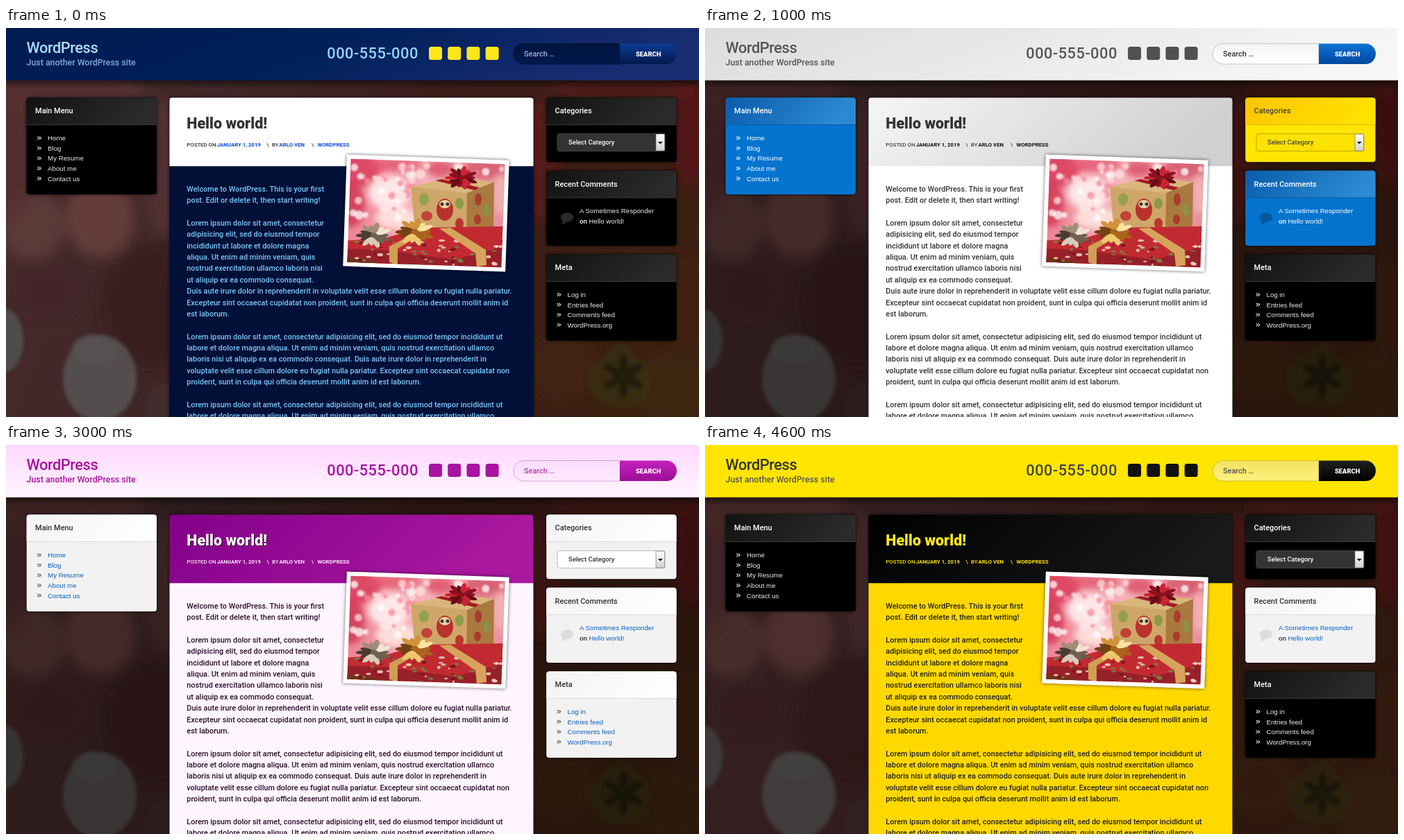
These frames come from a looping animation (998x561 px, 5 s). An HTML page:

```html
<!DOCTYPE html>
<html lang="en">
<head>
<meta charset="utf-8">
<title>Theme colours</title>
<style>
html, body { margin: 0; width: 100%; height: 100%; overflow: hidden; background: #000; }
svg { display: block; width: 998px; height: 561px; }
text { font-family: Roboto, sans-serif; font-weight: 500; white-space: pre; }
.link { font-family: "Liberation Sans", Arial, sans-serif; font-weight: 400; }
</style>
</head>
<body>
<svg id="stage" viewBox="0 0 998 561" xmlns="http://www.w3.org/2000/svg"></svg>
<script>
const stage = document.getElementById('stage');
const HOLD = 1000;

// Sidebar panel skins
const skins = {
  black: { head: ['#121212', '#2b2b2b'], body: '#000', line: '#3a3a3a', title: '#fff', link: '#eee', icon: '#ccc', bubble: '#2a2a2a', field: '#333', edge: '#444' },
  blue: { head: ['#0a5cab', '#2c8ad3'], body: '#0574cf', line: '#0a5ba5', title: '#fff', link: '#fff', icon: '#d5e8f8', bubble: '#04589e', field: '#0574cf', edge: '#0459a0' },
  yellow: { head: ['#ffc400', '#ffe100'], body: '#ffe500', line: '#dfb900', title: '#444', link: '#222', icon: '#444', bubble: '#c9a900', field: '#fbe200', edge: '#c4a500' },
  white: { head: ['#f3f3f3', '#fefefe'], body: '#f2f2f2', line: '#d9d9d9', title: '#333', link: '#0a60c0', icon: '#666', bubble: '#dcdcdc', field: '#fff', edge: '#bbb' }
};

// panels: menu, categories, comments, meta
const themes = [
  { dim: 0, bar: ['#001b50', '#00205a', '#182d72'], barDir: 'diag', name: '#a9dcff', tag: '#7ea9dc', phone: '#99d4fb', icons: '#ffe61a',
    input: ['#001440', '#00194c'], inputEdge: '#00102f', hint: '#9ab3da', button: ['#0c3c92', '#00194e'],
    head: ['#fff', '#fff'], title: '#333', meta: '#333', metaLink: '#0a4bd0', body: '#001037', text: '#7cc6f8', frame: '#fff',
    panels: ['black', 'black', 'black', 'black'] },
  { dim: .3, bar: ['#dcdcdc', '#f6f6f6'], barDir: 'diag', name: '#555', tag: '#555', phone: '#555', icons: '#505050',
    input: ['#f4f4f4', '#fff'], inputEdge: '#c4c4c4', hint: '#333', button: ['#0d72d4', '#00479f'],
    head: ['#f5f5f5', '#d0d0d0'], title: '#333', meta: '#444', metaLink: '#111', body: '#fff', text: '#333', frame: '#fff',
    panels: ['blue', 'yellow', 'blue', 'black'] },
  { dim: 0, bar: ['#0f0028', '#0b0020'], barDir: 'down', name: '#d2bcff', tag: '#eac0ff', phone: '#d8c0f2', icons: '#dab8fb',
    input: ['#23115e', '#331a86'], inputEdge: '#1a0c48', hint: '#b9a5e4', button: ['#14003c', '#080019'],
    head: ['#190045', '#330057'], title: '#e6d5ff', meta: '#d9c4f5', metaLink: '#d9c4f5', body: '#12001f', text: '#e0d2f3', frame: '#050008',
    panels: ['black', 'black', 'black', 'black'] },
  { dim: .3, bar: ['#ffd8ff', '#fff5ff'], barDir: 'down', name: '#a8139f', tag: '#a8139f', phone: '#a8139f', icons: '#a8139f',
    input: ['#fbdcfb', '#ffeaff'], inputEdge: '#d3a4d3', hint: '#b83bb1', button: ['#c61fbd', '#9c0f95'],
    head: ['#83008a', '#ab189f'], title: '#fff', shade: '#300030', meta: '#fbe6fb', metaLink: '#fbe6fb', body: '#fff5ff', text: '#2a1029', frame: '#fff',
    panels: ['white', 'white', 'white', 'white'] },
  { dim: .22, bar: ['#ffe500', '#ffe500'], barDir: 'down', name: '#333', tag: '#555', phone: '#444', icons: '#111',
    input: ['#f3e15e', '#fff27f'], inputEdge: '#d2bd22', hint: '#555', button: ['#202020', '#000'],
    head: ['#000', '#191919'], title: '#ffe81a', meta: '#ffe500', metaLink: '#ffe500', body: '#ffd800', text: '#222', frame: '#fff',
    panels: ['black', 'black', 'white', 'black'] }
];

const copy = [
  'Welcome to WordPress. This is your first',
  'post. Edit or delete it, then start writing!',
  '',
  'Lorem ipsum dolor sit amet, consectetur',
  'adipisicing elit, sed do eiusmod tempor',
  'incididunt ut labore et dolore magna',
  'aliqua. Ut enim ad minim veniam, quis',
  'nostrud exercitation ullamco laboris nisi',
  'ut aliquip ex ea commodo consequat.',
  'Duis aute irure dolor in reprehenderit in voluptate velit esse cillum dolore eu fugiat nulla pariatur.',
  'Excepteur sint occaecat cupidatat non proident, sunt in culpa qui officia deserunt mollit anim id',
  'est laborum.',
  '',
  'Lorem ipsum dolor sit amet, consectetur adipisicing elit, sed do eiusmod tempor incididunt ut',
  'labore et dolore magna aliqua. Ut enim ad minim veniam, quis nostrud exercitation ullamco',
  'laboris nisi ut aliquip ex ea commodo consequat. Duis aute irure dolor in reprehenderit in',
  'voluptate velit esse cillum dolore eu fugiat nulla pariatur. Excepteur sint occaecat cupidatat non',
  'proident, sunt in culpa qui officia deserunt mollit anim id est laborum.'
];
copy.push('', copy[13], copy[14]);

// Baselines sit on whole pixels
const text = (x, y, size, fill, str, more = '') => `<text x="${x}" y="${Math.round(y)}" font-size="${size}" fill="${fill}" ${more}>${str}</text>`;
const link = (x, y, fill, str) => text(x, y, 9.7, fill, str, 'class="link"');
const rect = (x, y, w, h, fill, more = '') => `<rect x="${x}" y="${y}" width="${w}" height="${h}" fill="${fill}" ${more}/>`;
const path = (d, fill, more = '') => `<path d="${d}" fill="${fill}" ${more}/>`;
const ellipse = ([x, y, rx, ry, fill, opacity = 1]) => `<ellipse cx="${x}" cy="${y}" rx="${rx}" ry="${ry}" fill="${fill}" opacity="${opacity}"/>`;
const ends = { down: 'x2="0" y2="1"', across: 'x2="1" y2="0"', diag: 'x2="1" y2=".2"' };
const gradient = (id, colours, dir) => `<linearGradient id="${id}" ${ends[dir]}>` +
  colours.map((c, i) => `<stop offset="${i / (colours.length - 1)}" stop-color="${c}"/>`).join('') + '</linearGradient>';
const blur = (id, amount) => `<filter id="${id}" x="-30%" y="-30%" width="160%" height="160%"><feGaussianBlur stdDeviation="${amount}"/></filter>`;

function seeded(seed) {
  return () => (seed = seed * 16807 % 2147483647) / 2147483647;
}

function backdrop(dim) {
  const lights = [
    [60, 90, 140, 40, '#5c3434', .7], [135, 273, 50, 58, '#6f4440', .75], [38, 285, 46, 50, '#65403e', .75],
    [5, 190, 40, 90, '#573133', .7], [215, 400, 80, 90, '#3a1d1d', .7], [60, 380, 50, 40, '#422628', .7],
    [226, 200, 30, 100, '#5c3836', .6], [770, 190, 30, 90, '#5f1b1e', .7], [890, 88, 110, 22, '#551d1a', .7],
    [985, 150, 25, 80, '#5e1517', .7], [985, 400, 40, 70, '#442415', .7], [800, 490, 50, 50, '#472417', .6], [960, 520, 60, 50, '#40280f', .7]
  ];
  const greys = [[135, 505, 53, 62, '#555151', .95], [128, 464, 33, 22, '#555151', .95], [-3, 450, 28, 46, '#524e4d', .95], [225, 548, 24, 35, '#453231', .5]];
  const leaves = [0, 60, 120, 180, 240, 300].map(a => `<ellipse cx="889" cy="485" rx="6" ry="15" fill="#1b190a" transform="rotate(${a} 889 502)"/>`).join('');
  return rect(0, 0, 998, 561, 'url(#ground)') +
    `<g filter="url(#soft)">${lights.map(ellipse).join('')}</g>` +
    `<g filter="url(#edge)">${greys.map(ellipse).join('')}` +
    path('M888 452Q905 465 926 490Q938 520 915 542Q890 555 856 541Q828 520 838 490Q862 470 888 452Z', '#38300f', 'opacity=".7"') +
    `<g opacity=".75">${leaves}</g></g>` +
    rect(0, 0, 998, 561, '#000', `opacity="${dim}"`) + rect(0, 75, 998, 12, 'url(#fall)');
}

function bow(x, y, size, colours) {
  const petals = Array.from({ length: 14 }, (_, i) =>
    `<ellipse cx="${x + size * (i % 2 ? .6 : .4)}" cy="${y}" rx="${size * .42}" ry="${size * .16}" fill="${colours[i % colours.length]}" transform="rotate(${i * 77} ${x} ${y})"/>`).join('');
  return `<g transform="translate(0 ${y * .3}) scale(1 .7)">${petals}<circle cx="${x}" cy="${y}" r="${size * .2}" fill="${colours[0]}"/></g>`;
}

function photo(frame) {
  const rnd = seeded(71);
  const washes = [
    [505, 205, 34, 24, '#d93a58', .8], [497, 255, 20, 32, '#cf3450', .8], [560, 197, 40, 10, '#e2506a', .7],
    [552, 238, 30, 24, '#fff0f0', .9], [562, 274, 30, 16, '#ffe9e2', .85], [625, 203, 20, 12, '#d8405a', .7],
    [690, 203, 32, 14, '#d4566a', .8], [712, 240, 10, 30, '#f2b4b4', .9]
  ];
  const sparks = Array.from({ length: 46 }, (_, i) => {
    const r = 2.5 + rnd() * 4.5;
    return ellipse([497 + rnd() * (i % 4 ? 90 : 220), 195 + rnd() * (i % 4 ? 85 : 20), r, r, ['#fff', '#ffdfe2', '#f58a9b'][i % 3], .75]);
  }).join('');
  const prints = [
    [632, 262, 12, 16, '#b9322c'], [632, 254, 8, 6, '#e8d6a6'], [628, 254, 2.5, 2.5, '#433'], [636, 254, 2.5, 2.5, '#433'],
    [602, 247, 7, 9, '#95a04d'], [606, 271, 8, 7, '#c34237'], [653, 253, 6, 8, '#8d9a48'], [653, 282, 6, 8, '#b8372f'],
    [680, 247, 5, 9, '#a93c2c'], [693, 262, 5, 9, '#8a9147'], [679, 276, 5, 7, '#a93c2c']
  ];
  const dots = Array.from({ length: 70 }, (_, i) =>
    ellipse([496 + rnd() * 222, 306 + rnd() * 38, 1.5 + rnd() * 3, 1 + rnd() * 1.5, ['#f4d9c5', '#788343', '#7a121a'][i % 3], .85])).join('');
  return `<g transform="rotate(2 605 267)">${rect(488, 186.5, 234, 161, '#000', 'filter="url(#shadow)" opacity=".6"')}${rect(488, 186.5, 234, 161, frame)}</g>` +
    `<g clip-path="url(#print)">${rect(484, 182, 242, 170, 'url(#rosy)')}<g filter="url(#bokeh)">${washes.map(ellipse).join('')}</g><g filter="url(#spark)">${sparks}</g>` +
    path('M583 229L642 215L703 222L664 238Z', '#d9b67c') + path('M583 229L664 238L663 303L589 292Z', '#cfa669') + path('M664 238L703 222L702 290L663 303Z', '#a9793f') +
    prints.map(ellipse).join('') + path('M618 220L628 218L682 230L675 234Z', '#a31a28') +
    bow(656, 216, 24, ['#8b111d', '#c92434', '#650c16']) +
    path('M484 307L546 303L598 288L718 286V320L646 334L560 350H484Z', '#c22a32') + path('M484 318L546 320L646 334L718 315V350H484Z', '#98202a') +
    path('M484 330L530 336L560 350H484Z', '#6d3419') + dots +
    path('M624 289L640 288L691 320L692 342L678 344L676 325Z', '#d6a45c') + path('M552 315L600 290L610 291L564 318V342L552 338Z', '#cf9f55') +
    bow(589, 294, 28, ['#a9651d', '#f1c66d', '#744213', '#d0923a', '#ffe3a0']) + bow(530, 299, 26, ['#6f6052', '#d9cbb9', '#4a3b31', '#a08d77', '#efe4d4']) + '</g>';
}

function topBar(t) {
  const squares = [609, 636.2, 663.4, 690.6].map(x => rect(x, 27, 19, 19, t.icons, 'rx="3.5"')).join('');
  return rect(0, 0, 998, 75.5, 'url(#bar)') +
    text(29.5, 36, 21.84, t.name, 'WordPress', 'letter-spacing="-.45"') + text(29.5, 54.4, 12.4, t.tag, 'Just another WordPress site') +
    text(462.3, 43.8, 21.84, t.phone, '000-555-000', 'letter-spacing=".5"') + squares +
    path('M884 22.5H745.5A14.75 14.75 0 0 0 745.5 52H884Z', 'url(#input)', `stroke="${t.inputEdge}"`) +
    path('M884 22.5H951.2A14.75 14.75 0 0 1 951.2 52H884Z', 'url(#button)') +
    text(746, 41, 10.92, t.hint, 'Search …') + text(907, 40.6, 9.36, '#fff', 'SEARCH', 'style="font-weight:900"');
}

function article(t) {
  const weight = n => `style="font-weight:${n}"`;
  const meta = (x, str, strong) => text(x, 171.2, 7.8, strong ? t.metaLink : t.meta, str, strong ? weight(700) : '');
  const heading = (x, y, fill) => text(x, y, 21.5, fill, 'Hello world!', weight(900));
  return rect(235.5, 100.5, 524, 480, '#000', 'rx="4" filter="url(#shadow)" opacity=".7"') +
    rect(235.5, 199, 524, 380, t.body) +
    path('M235.5 199.3V104.5Q235.5 100.5 239.5 100.5H755.5Q759.5 100.5 759.5 104.5V199.3Z', 'url(#head)') +
    (t.shade ? heading(261.3, 146, t.shade) : '') + heading(260.3, 145, t.title) +
    meta(260.3, 'POSTED ON') + meta(303.8, 'JANUARY 1, 2019', true) + meta(375.5, '\\') + meta(383, 'BY') +
    meta(393.6, 'ARLO VEN', true) + meta(440, '\\') + meta(448.4, 'WORDPRESS', true) +
    copy.map((line, i) => text(260.3, 235.7 + i * 16.38, 10.92, t.text, line)).join('') + photo(t.frame);
}

function panel(x, y, h, title, skin, content) {
  const s = skins[skin], w = 187.3;
  return rect(x, y, w, h, '#000', 'rx="4" filter="url(#shadow)" opacity=".7"') + rect(x, y, w, h, s.body, 'rx="4"') +
    path(`M${x} ${y + 39}V${y + 4}q0-4 4-4h${w - 8}q4 0 4 4V${y + 39}Z`, `url(#${skin})`) + rect(x, y + 38.5, w, 1, s.line) +
    text(x + 12.4, y + 22.7, 10.92, s.title, title) + content(s);
}

const list = (x, y, items) => s => items.map((item, i) => {
  const row = y + i * 14.55;
  return path(`M${x} ${row - 5.8}l2.3 2.3l-2.3 2.3m2.8-4.6l2.3 2.3l-2.3 2.3`, 'none', `stroke="${s.icon}" stroke-width="1.2"`) + link(x + 14.8, row, s.link, item);
}).join('');

const chooser = s => rect(794, 152.5, 155, 25, s.field, `rx="3" stroke="${s.edge}"`) +
  text(810, 167.7, 9.36, s.title, 'Select Category') +
  rect(936, 153, 12.5, 24, 'url(#knob)', 'stroke="#777" stroke-width=".7"') + path('M939 164h6.6l-3.3 3.6Z', '#000');

const comment = s => ellipse([808, 273, 9.3, 6.6, s.bubble]) + path('M802 276q0 5-3 7q6 0 9-4Z', s.bubble) +
  link(826, 267.3, s.link, 'A Sometimes Responder') + text(826, 282, 9.7, s.title, 'on') + link(839.5, 282, s.link, 'Hello world!');

function draw(t) {
  const defs = gradient('bar', t.bar, t.barDir) + gradient('input', t.input, 'down') + gradient('button', t.button, 'down') +
    gradient('head', t.head, 'diag') + Object.entries(skins).map(([id, s]) => gradient(id, s.head, 'diag')).join('') +
    gradient('ground', ['#4a2c2d', '#402728', '#3c1d19', '#3c2012'], 'diag') + gradient('rosy', ['#ee7f92', '#f6b4ba', '#e68c98'], 'across') +
    gradient('knob', ['#fff', '#d2d2d2'], 'down') + gradient('fall', ['#00000080', '#00000000'], 'down') +
    blur('soft', 9) + blur('edge', 2.5) + blur('bokeh', 4) + blur('spark', .8) + blur('shadow', 2.5) +
    '<clipPath id="print"><rect x="494" y="192.5" width="222" height="149" transform="rotate(2 605 267)"/></clipPath>';
  const [menu, categories, comments, meta] = t.panels;
  stage.innerHTML = `<defs>${defs}</defs>` + backdrop(t.dim) + topBar(t) + article(t) +
    panel(29.7, 100.5, 139.5, 'Main Menu', menu, list(45.3, 162.3, ['Home', 'Blog', 'My Resume', 'About me', 'Contact us'])) +
    panel(778.2, 100.5, 92.8, 'Categories', categories, chooser) +
    panel(778.2, 205.8, 108.2, 'Recent Comments', comments, comment) +
    panel(778.2, 326.5, 124.5, 'Meta', meta, list(793.7, 388, ['Log in', 'Entries feed', 'Comments feed', 'WordPress.org']));
}

let shown = -1;
const start = performance.now();
function tick(now) {
  const index = Math.floor(Math.max(0, now - start) / HOLD) % themes.length;
  if (index !== shown) draw(themes[shown = index]);
  requestAnimationFrame(tick);
}
tick(start);
</script>
</body>
</html>
```
